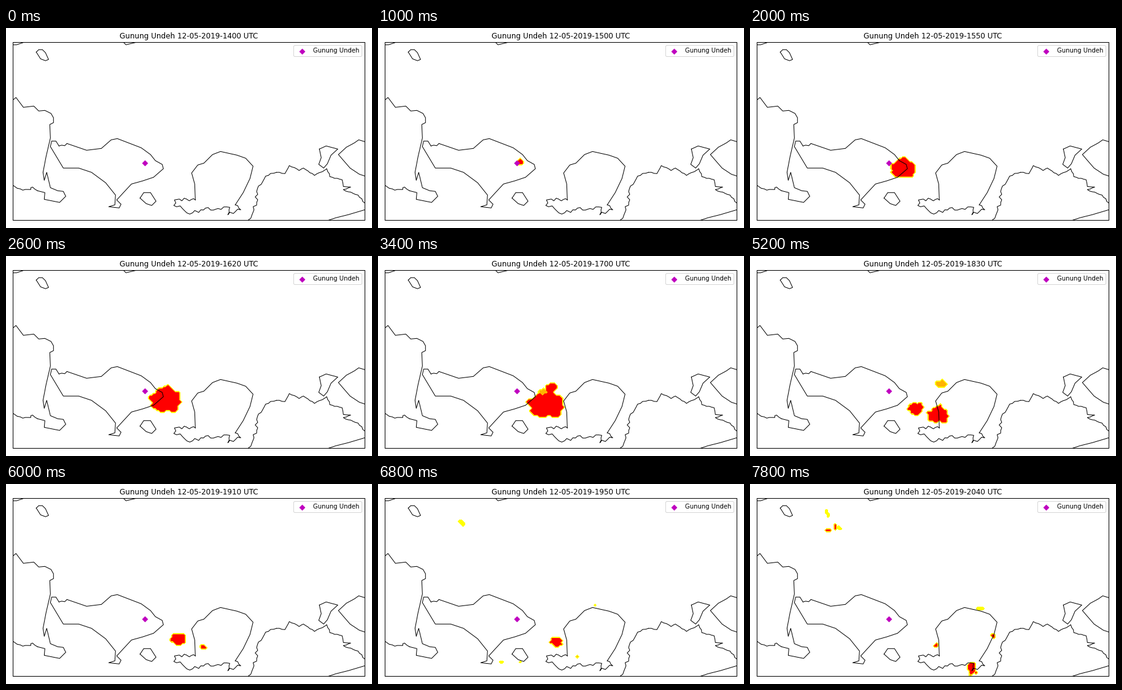
Write a matplotlib script that moves like this. It is 596x326 px and loops after 8000 ms.

```python
import numpy as np
import matplotlib.pyplot as plt
from matplotlib.animation import FuncAnimation

W, H, DPI = 596, 326, 72
LEFT, RIGHT, TOP, BOTTOM = 11, 584, 23, 313
FRAMES, STEP_MS = 40, 200
NAME = "Gunung Undeh"
CELL = 2.9
LEVELS = [0.2, 1.6, 2.3, 4]
COLORS = ["#ffff00", "#ffb300", "#ff0000"]

# Drifting ash: birth, death, start x y, end x y, radii, frame it turns thin
PUFFS = [
    (3.5, 31, 226, 216, 324, 268, 27, 22, 99),
    (15, 26, 262, 220, 302, 230, 14, 8, 0),
    (13, 30, 271, 215, 322, 206, 12, 7, 24),
    (14, 41, 239, 235, 308, 265, 12, 9, 99),
    (34, 44, 361, 299, 361, 299, 6, 9, 99),
]

# Short streaks of false alarms: x0, y0, x1, y1, strength
EARLY = [(134, 61, 139, 66, 0.9), (353, 198, 353, 198, 0.5),
         (325, 280, 325, 280, 2), (230, 289, 230, 289, 0.5),
         (200, 291, 202, 291, 0.6)]
LATE = [(123, 42, 128, 52, 0.9), (124, 75, 131, 75, 3),
        (138, 71, 140, 66, 3), (143, 70, 146, 73, 0.6),
        (371, 202, 380, 204, 0.9), (395, 247, 398, 248, 3),
        (358, 309, 360, 313, 2), (369, 308, 369, 308, 3)]

gx, gy = np.meshgrid(np.arange(LEFT, RIGHT + 3, CELL),
                     np.arange(TOP, BOTTOM + 4, CELL))
rng = np.random.default_rng(4)
phases = rng.uniform(0, 2 * np.pi, (len(PUFFS), 3))

plt.rcParams["font.family"] = "DejaVu Sans"
fig = plt.figure(figsize=(W / DPI, H / DPI), dpi=DPI, facecolor="white")
# the small offset makes the frame snap to whole pixels
ax = fig.add_axes([(LEFT + 0.3) / W, 1 - (BOTTOM + 0.3) / H,
                   (RIGHT - LEFT) / W, (BOTTOM - TOP) / H])
ax.set(xlim=(LEFT, RIGHT), ylim=(BOTTOM, TOP), xticks=[], yticks=[])
ax.autoscale(False)
for spine in ax.spines.values():
    spine.set_linewidth(1)


def coast(points, jag=0):
    """Draw a shoreline; jag adds small random inlets along it."""
    pts = np.array(points, float)
    if jag:
        fine = [pts[:1]]
        for a, b in zip(pts, pts[1:]):
            length = np.hypot(*(b - a))
            n = max(2, int(length / 4))
            u = np.arange(1, n + 1)[:, None] / n
            normal = np.array([a[1] - b[1], b[0] - a[0]]) / length
            shift = rng.uniform(-jag, jag, (n, 1))
            shift[-1] = 0
            fine.append(a + u * (b - a) + shift * normal)
        pts = np.vstack(fine)
    ax.plot(*pts.T, color="black", lw=1, zorder=2)


def draw_map():
    coast([(11, 27), (17, 27), (29, 23)])
    coast([(190, 22), (195, 27), (212, 23)])
    coast([(49, 39), (53, 35), (59, 35), (64, 40), (69, 51), (64, 53),
           (56, 50), (49, 39)])
    # western shore
    coast([(11, 117), (16, 113), (28, 129), (45, 127), (53, 135), (63, 134),
           (73, 139), (77, 146), (77, 154), (71, 157), (72, 179), (65, 209),
           (60, 235), (62, 248), (66, 235), (72, 260), (84, 265), (93, 266),
           (97, 274), (87, 284), (62, 279), (63, 268), (51, 265)])
    coast([(51, 265), (43, 259), (40, 263), (27, 264), (18, 261),
           (11, 256)], jag=2)
    # volcano island and its small neighbour
    coast([(86, 192), (99, 188)], jag=2.5)
    coast([(99, 188), (131, 199), (155, 196), (171, 182), (181, 180),
           (220, 195), (235, 206), (243, 216), (254, 222), (256, 229),
           (240, 243), (222, 249), (204, 254), (191, 268), (180, 280),
           (187, 287), (184, 293), (167, 291), (177, 288), (178, 272),
           (162, 252), (139, 235), (118, 228), (93, 228), (84, 213),
           (72, 193), (74, 184), (81, 184), (86, 192)])
    coast([(218, 277), (224, 268), (235, 268), (244, 282), (237, 289),
           (228, 286), (218, 277)])
    # round island
    coast([(308, 280), (307, 254), (302, 236), (312, 223), (322, 220),
           (336, 206), (349, 201), (376, 207), (390, 212), (402, 225),
           (397, 245), (386, 268), (373, 288)])
    coast([(373, 288), (382, 296), (361, 304), (364, 292), (345, 294),
           (317, 296), (299, 303), (287, 294), (273, 289), (274, 280),
           (302, 279), (308, 280)], jag=3)
    # eastern island
    coast([(394, 313), (402, 300), (408, 284), (409, 262), (420, 246),
           (440, 235)], jag=3.5)
    coast([(440, 235), (454, 237), (461, 224), (477, 232), (484, 228),
           (502, 240), (522, 229), (527, 242), (547, 247), (549, 258),
           (561, 259), (549, 263), (573, 272), (584, 285)], jag=1)
    coast([(510, 197), (521, 192), (540, 197), (529, 207), (523, 221),
           (517, 228), (509, 222), (513, 211), (510, 197)])
    coast([(584, 185), (574, 182), (567, 187), (554, 194), (541, 206),
           (547, 213), (560, 228), (575, 238), (584, 241)])
    coast([(525, 313), (537, 309), (557, 304), (584, 296)])


def inside_puff(i, puff, phase):
    """Grid cells under a lumpy ellipse that drifts, swells and fades."""
    birth, death, x0, y0, x1, y1, rx, ry, _ = puff
    u = (i - birth) / (death - birth)
    if not 0 < u < 1:
        return np.zeros(gx.shape, bool)
    size = np.sin(np.pi * u) ** 0.9
    dx = (gx - x0 - u * (x1 - x0)) / (rx * size)
    dy = (gy - y0 - u * (y1 - y0)) / (ry * size)
    angle = np.arctan2(dy, dx)
    lumps = sum(np.sin(k * angle + p) for k, p in zip((3, 5, 8), phase))
    return np.hypot(dx, dy) < 1 + (0.04 + 0.06 * u) * lumps


def ash(i):
    z = np.zeros(gx.shape)
    for puff, phase in zip(PUFFS, phases):
        z[inside_puff(i, puff, phase)] = 3 if i < puff[-1] else 2
    streaks = LATE if i >= 37 else EARLY if i >= 33 else []
    for x0, y0, x1, y1, value in streaks:
        cols = np.rint((np.linspace(x0, x1, 9) - LEFT) / CELL).astype(int)
        rows = np.rint((np.linspace(y0, y1, 9) - TOP) / CELL).astype(int)
        z[rows, cols] = value
    return z


def stamp(i):
    # the 14:40 scan is missing
    minutes = 14 * 60 + 10 * (i + (i >= 4))
    return f"{NAME} 12-05-2019-{minutes // 60:02d}{minutes % 60:02d} UTC"


draw_map()
ax.scatter([226], [220], marker="D", color="m", zorder=3, label=NAME)
ax.legend(loc="upper right", fontsize=10)
title = ax.set_title(stamp(0), fontsize=12)
layers = []


def draw(i):
    while layers:
        layers.pop().remove()
    title.set_text(stamp(i))
    z = ash(i)
    if z.any():
        layers.append(ax.contourf(gx, gy, z, levels=LEVELS, colors=COLORS,
                                  zorder=1))
    return [title]


anim = FuncAnimation(fig, draw, frames=FRAMES, init_func=lambda: draw(0),
                     interval=STEP_MS, repeat=True, repeat_delay=0, blit=False)
plt.show()
```
